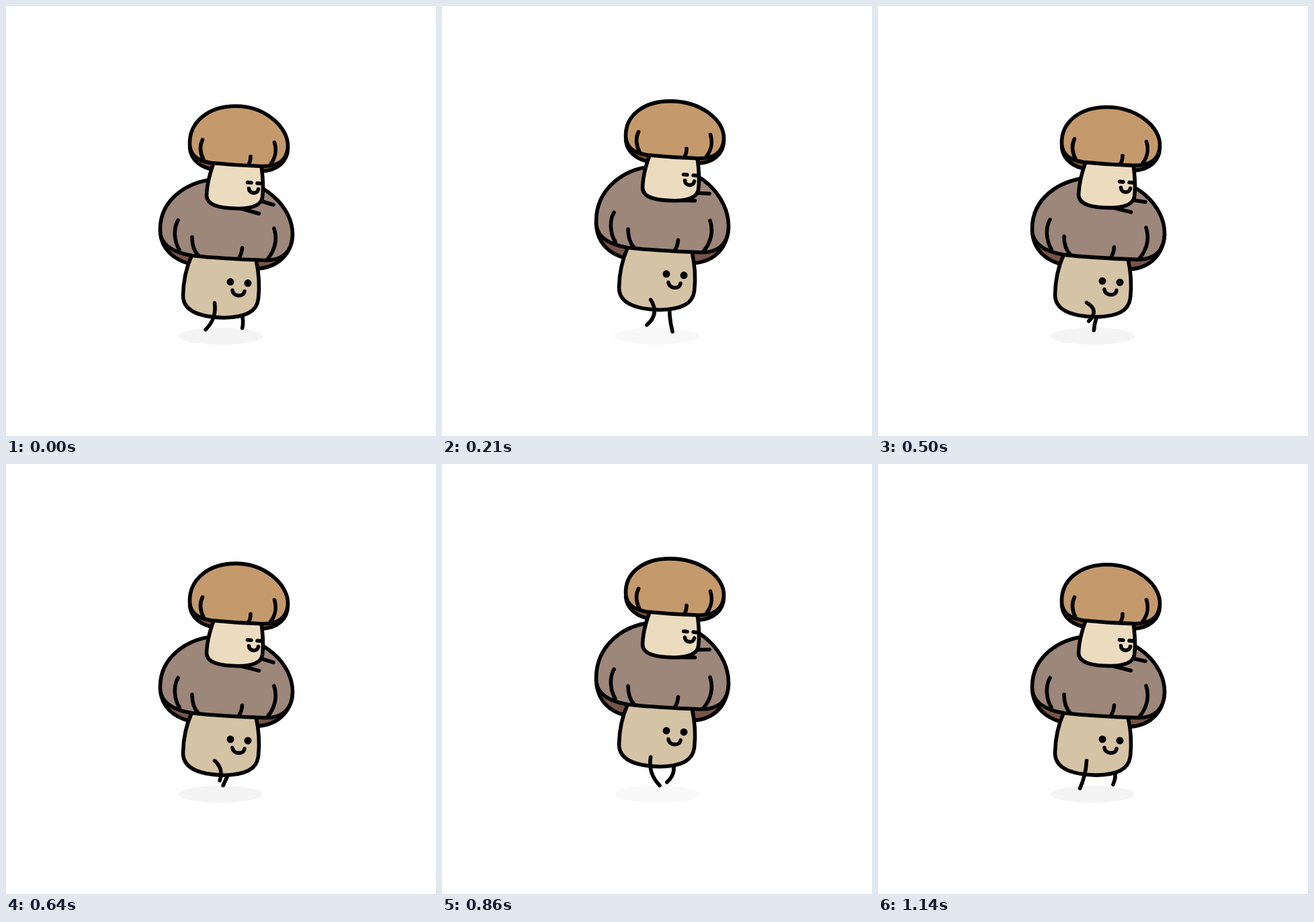
These frames come from a looping animation (640x640 px, 1210 ms). An HTML page:

```html
<!DOCTYPE html>
<html lang="en">
<head>
<meta charset="utf-8">
<title>Mushroom walk</title>
<style>
  html, body { margin: 0; width: 100%; height: 100%; overflow: hidden; background: #fff; }
  svg { display: block; width: 100vw; height: 100vh; }
  path { fill: none; stroke: #000; stroke-width: 5.6; stroke-linecap: round; stroke-linejoin: round; }
</style>
</head>
<body>
<svg viewBox="0 0 640 640">
  <ellipse id="shadow" cx="319.5" cy="491.3" rx="62.7" ry="12.7"/>
  <path id="backLeg"/>
  <g id="body">
    <path id="bigGill" style="fill:#775548"/>
    <path style="fill:#d4c3a5" d="M276 372C268 390 264 410 263.5 430C263 452 283 463 325 464C357 463 373 455 375.5 436C378 415 376 395 372 377"/>
    <path id="bigDome" style="fill:#9c877a"/>
    <path d="M256 319C249 331 250 350 258 363M277 344C277 355 279 364 286 371M351.5 360C351 367 349 372 346 376M399 331C404 346 401 363 389 377"/>
    <circle cx="334" cy="410.5" r="5.5"/>
    <circle cx="360" cy="412.5" r="5.5"/>
    <path d="M337 423C338 433 354 433.5 355 424.5"/>

    <path id="smallLegs"/>
    <path style="fill:#7b5131" d="M273.5 211C275 230 292 242 312 244L380 246C405 245 419 231 419.5 212Z"/>
    <path style="fill:#ecdcbf" d="M309 234C303 250 299 268 298.5 282C299 297 318 301 346 301.5C367 301 380 296 381.5 285C384 268 382 252 380 237"/>
    <path id="smallDome" style="fill:#c49a6c"/>
    <path d="M292.5 199C288 208 288.5 218 294 229M364 224C364 229 363 234 360 237M399.5 203C403 214 401 226 394 235"/>
    <path d="M359.5 262.5L365 263M374 263.7L381 264.3M361.5 271.5C362 280 374.5 280.5 375.5 272.5"/>
  </g>
  <path id="frontLeg"/>
</svg>
<script>
const LOOP = 1210, STEPS = 17;
const el = id => document.getElementById(id);
const draw = (id, d) => el(id).setAttribute('d', d);

// swings `cycles` times per loop, reaching 1 at step `peak`
const swing = (step, peak, cycles = 1) => Math.cos(2 * Math.PI * cycles * (step - peak) / STEPS);

// a curve from hip to foot, pushed sideways by `bend` at its middle
function leg(id, hip, foot, bend) {
  const dx = foot[0] - hip[0], dy = foot[1] - hip[1];
  const k = 2 * bend / Math.hypot(dx, dy);
  const kneeX = (hip[0] + foot[0]) / 2 + dy * k;
  const kneeY = (hip[1] + foot[1]) / 2 - dx * k;
  draw(id, `M${hip}Q${kneeX} ${kneeY} ${foot}`);
}

function render(n) {
  // two bobs per loop, slightly uneven; the cap squash lags behind
  const y = -6.9 + 7 * swing(n, 8.1, 2) + swing(n, 8.1, 4) + 1.1 * swing(n, 5.8);
  const squash = 3.2 - 3.3 * swing(n, 0.4, 2);
  const rise = -0.6 * y, drop = 0.8 * squash;

  const grey = Math.round(244 - 0.35 * y);
  el('shadow').setAttribute('fill', `rgb(${grey},${grey},${grey})`);
  el('body').setAttribute('transform', `translate(0 ${y})`);

  const bigTop = 257 - rise, smallTop = 149 + squash;
  draw('bigDome', `M229.5 333C229 ${290 - rise / 2} 268 ${bigTop} 325 ${bigTop}
    C385 ${bigTop} 427 ${300 - rise / 2} 426.5 340C426 366 411 379 385 378.5
    C345 377 305 374.5 277 371.5C244 366 229 352 229.5 333Z`);
  draw('bigGill', `M229.5 336C231 ${362 + drop} 250 ${378 + drop} 275 ${384 + drop}
    L372 ${391 + drop}C402 ${390 + drop} 424 ${372 + drop} 426.5 342Z`);
  draw('smallDome', `M273.5 207C272 ${172 + squash / 3} 302 ${smallTop} ${342 - 0.6 * squash} ${smallTop}
    C385 ${smallTop} 421 ${180 + squash / 3} 419.5 210C418 230 405 239 380 238.5
    C350 237.5 325 235.5 305 233.5C285 230 275 223 273.5 207Z`);
  draw('smallLegs', `M379 290L398 ${296 - 1.15 * squash}M348 301L376.5 ${Math.max(301.5, 309 + 0.9 * y)}`);

  const hipY = 442 + 0.42 * y;
  leg('frontLeg', [310.5, hipY],
    [311.3 + 11.5 * swing(n, 10) + 4.5 * swing(n, 4, 2), 476 + 7 * swing(n, 15.3)],
    3.5 + 7.5 * swing(n, 4.5) + 2.5 * swing(n, 0, 2));
  leg('backLeg', [339, hipY],
    [336.5 + 15 * swing(n, 16.7) + 2 * swing(n, 1.9, 2), 479.4 + 6 * swing(n, 4.3)],
    2.5 + 7.5 * swing(n, 14));
}

let shown = -1;
const begin = performance.now();
function tick() {
  const t = (performance.now() - begin) % LOOP;
  // a few ms early, as step times are rounded down to 10 ms
  const step = Math.min(STEPS - 1, Math.floor((t + 4) / LOOP * STEPS));
  if (step !== shown) render(shown = step);
  requestAnimationFrame(tick);
}
tick();
</script>
</body>
</html>
```
